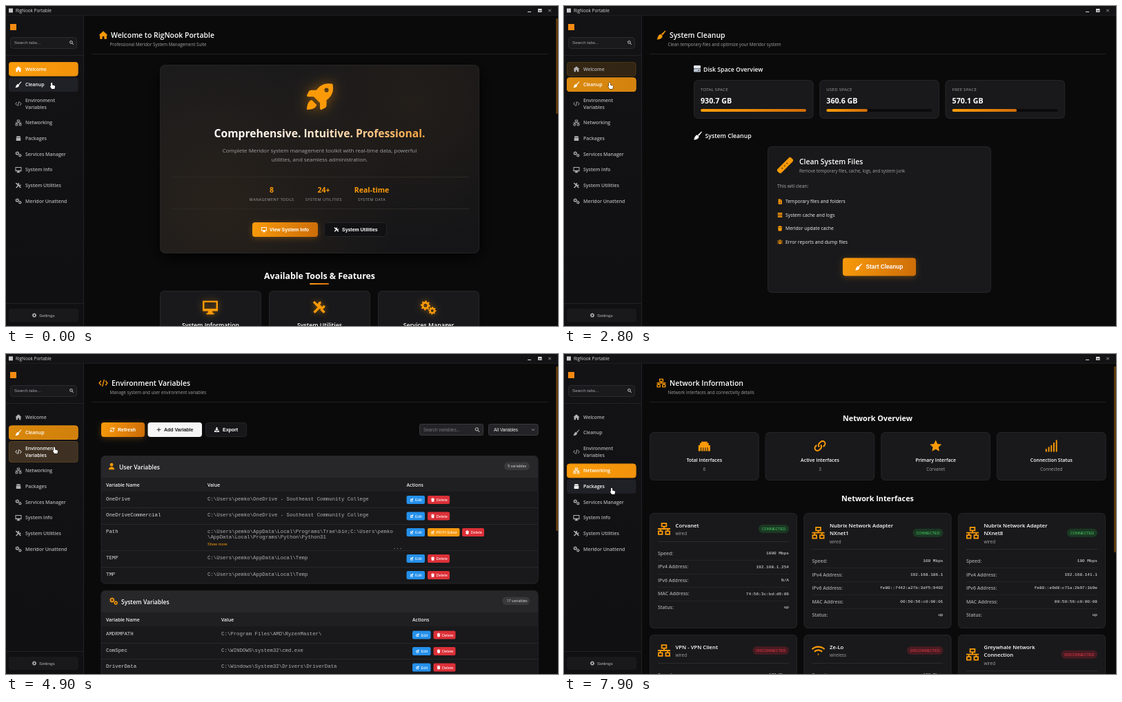
Write an HTML page with a canvas that moves like this. It is 800 px wide and 463 px high and loops after 8 s.

```html
<!DOCTYPE html>
<html lang="en">
<head>
<meta charset="utf-8">
<title>RigNook Portable</title>
<style>
html,body{margin:0;width:100%;height:100%;overflow:hidden;background:#0a0a0b}
canvas{display:block}
</style>
</head>
<body>
<canvas id="stage" width="800" height="463"></canvas>
<script>
const c = document.getElementById('stage').getContext('2d', {alpha: false});
const LOOP = 8000, STEP = 100;
const UI = '"Open Sans","Noto Sans",sans-serif';
const BTN = '"Liberation Sans",Arial,sans-serif';
const MONO = '"Liberation Mono",monospace';
const ORANGE = '#fb9a08', WHITE = '#fff', GREY = '#a3a3a6', EDGE = '#252528';

// Icons on a 16 x 16 grid: [path, stroke width or 0 for fill]
const ICONS = {
  home: ['M8 1L0 8.2h2V15h4.300v-4.500h3.400V15H14V8.200h2z', 0],
  broom: ['M15 0l1 1-6 7.500-2-2zM7 6.500l3 3C10 13 7 15.500 1 16l-1-1 2.200-2L1 13l1.500-3C4 7.500 5.500 6.500 7 6.500z', 0],
  code: ['M4 4L.8 8 4 12M12 4l3.200 4-3.200 4M9.700 2L6.300 14', 1.7],
  net: ['M5 1h6v4H5zM.8 11h5v4h-5zM10.200 11h5v4h-5zM8 5v3M0 8h16M3.300 8v3M12.700 8v3', 1.6],
  box: ['M3 1h10l2 4H1zM1 6h14v9H1z', 0],
  monitor: ['M0 1h16v11H0zM1.800 2.800v6.700h12.400V2.800zM6 12h4l.7 2H12v1.500H4V14h1.300z', 0],
  tools: ['M2 14L10 6M10 2.300A3.200 3.200 0 1 0 13.700 6M1.500 1.500L7 7M10 10l4 4', 2.7],
  search: ['M11 6.500A4.500 4.500 0 1 1 2 6.500A4.500 4.500 0 1 1 11 6.500M10 10l5 5', 2.3],
  rocket: ['M15.800.6Q15.700.2 15.300.2C14.400 0 13.600 0 13 0 9.500 0 7.400 1.900 5.800 4H2.600Q1.700 4 1.200 4.800L.1 7Q-.2 8 .8 8H4.200L8 11.800V15.200Q8 16.200 9 15.900L11.200 14.800Q12 14.400 12 13.400V10.200C14.100 8.600 16 6.500 16 3 16 2.300 16 1.500 15.800.6zM13.300 4A1.300 1.300 0 1 0 10.700 4A1.300 1.300 0 1 0 13.300 4zM3 10C1 10.300 0 13 0 15.900 3 16 5.700 15 6 13z', 0],
  file: ['M3 0h6v5h5v11H3zM10 0l4 4h-4zM8 7v3H6l2.500 3L11 10H9V7z', 0],
  data: ['M1 1h14v3.600H1zM1 6h14v4H1zM1 11.400h14V15H1z', 0],
  trash: ['M1 2h4l1-2h4l1 2h4v2H1zM2 5h12l-1 11H3z', 0],
  bug: ['M5 4a3 3 0 0 1 6 0zM4 5h8v6a4 4 0 0 1-8 0zM0 8h16v1.500H0zM1 3l4 3-1 1-4-3zM15 3l-4 3 1 1 4-3zM1 15l4-4-1-1-4 4zM15 15l-4-4 1-1 4 4z', 0],
  port: ['M0 7h2V4h2V2h8v2h2v3h2v8H0zM3 10v5h1v-5zM6 10v5h1v-5zM9 10v5h1v-5zM12 10v5h1v-5z', 0],
  link: ['M7 9.500a3.500 3.500 0 0 1 0-5l2-2a3.500 3.500 0 0 1 5 5l-1.500 1.500M9 6.500a3.500 3.500 0 0 1 0 5l-2 2a3.500 3.500 0 0 1-5-5L3.500 7', 1.9],
  star: ['M8 0l2.400 5.100 5.600.7-4.100 3.900 1.100 5.600L8 12.500 3 15.300l1.100-5.600L0 5.800l5.600-.7z', 0],
  signal: ['M0 12h1.800v4H0zM3.500 9.500h1.800V16H3.500zM7 7h1.800v9H7zM10.500 3.500h1.800V16h-1.800zM14 0h1.800v16H14z', 0],
  wifi: ['M0 6.500a11.500 11.500 0 0 1 16 0M3 9.500a7 7 0 0 1 10 0M7.400 13h1.200', 2],
  user: ['M12 4A4 4 0 1 0 4 4A4 4 0 1 0 12 4zM1 16c0-9 14-9 14 0z', 0],
  edit: ['M2 4h5v2H4v7h7v-3h2v5H2zM12 1l3 3-6 6-4 1 1-4z', 0],
  refresh: ['M2 7a6 6 0 0 1 11-2M14 1v5H9M14 9a6 6 0 0 1-11 2M2 15v-5h5', 2],
  plus: ['M8 1v14M1 8h14', 2.2],
  download: ['M6 0h4v6h4l-6 6-6-6h4zM0 11h4l4 3 4-3h4v5H0z', 0],
  down: ['M2 5l6 6 6-6', 2.5],
  close: ['M2 2l12 12M14 2L2 14', 2]
};
for (const k in ICONS) ICONS[k][0] = new Path2D(ICONS[k][0]);

function gear(x, y, r) {
  const p = new Path2D();
  for (let i = 0; i < 32; i++) {
    const a = i * Math.PI / 16, d = i % 4 < 2 ? r : r * .74;
    p.lineTo(x + d * Math.cos(a), y + d * Math.sin(a));
  }
  p.closePath();
  p.moveTo(x + r * .36, y);
  p.arc(x, y, r * .36, 0, 7);
  return p;
}
const twin = gear(5, 6, 5.2);
twin.addPath(gear(12.2, 11.5, 4.2));
ICONS.gears = [twin, 0];
ICONS.cog = [gear(8, 8, 8), 0];

function icon(name, x, y, size, color, glow = 0) {
  const [path, w] = ICONS[name];
  c.save();
  c.translate(x - size / 2, y - size / 2);
  c.scale(size / 16, size / 16);
  c.shadowColor = 'rgba(251,150,8,.5)';
  c.shadowBlur = glow;
  c.fillStyle = c.strokeStyle = color;
  c.lineWidth = w;
  if (w) c.stroke(path); else c.fill(path, 'evenodd');
  c.restore();
}

// y is the middle of the capitals
function text(s, x, y, size, color = WHITE, {w = 400, f = UI, a = 'left', ls = 0} = {}) {
  c.font = `${w} ${size}px ${f}`;
  c.textAlign = a;
  c.letterSpacing = ls + 'px';
  c.fillStyle = color;
  c.fillText(s, x, y + size * .36);
}
const semi = {w: 600}, mid = {a: 'center'}, midBold = {a: 'center', w: 700};
const btnFont = {f: BTN, w: 700}, mono = {f: MONO};

function box(x, y, x2, y2, r, fill, line) {
  c.beginPath();
  c.roundRect(x, y, x2 - x, y2 - y, r);
  c.fillStyle = fill;
  c.fill();
  if (line) {
    c.beginPath();
    c.roundRect(x + .5, y + .5, x2 - x - 1, y2 - y - 1, r);
    c.strokeStyle = line;
    c.lineWidth = 1;
    c.stroke();
  }
}
function rule(x, y, x2, color = '#222224') {
  c.fillStyle = color;
  c.fillRect(x, y, x2 - x, 1);
}
function blend(x, y, x2, y2, ...stops) {
  const g = c.createLinearGradient(x, y, x2, y2);
  stops.forEach((s, i) => g.addColorStop(i / (stops.length - 1), s));
  return g;
}
function haze(x, y, r, alpha) {
  const g = c.createRadialGradient(x, y, 0, x, y, r);
  g.addColorStop(0, `rgba(180,115,35,${alpha})`);
  g.addColorStop(1, 'rgba(180,115,35,0)');
  c.fillStyle = g;
  c.fillRect(x - r, y - r, 2 * r, 2 * r);
}
const card = (x, y, x2, y2) => box(x, y, x2, y2, 6, '#19191b', EDGE);

function hotButton(x, y, x2, y2) {
  c.save();
  c.shadowColor = 'rgba(245,150,10,.28)';
  c.shadowBlur = 8;
  c.shadowOffsetY = 2;
  box(x, y, x2, y2, 4, blend(x, y, x2, y2, '#f99b0b', '#cc6c08'));
  c.restore();
}
function header(name, title, sub, x = 153) {
  icon(name, 141, 42, 13, ORANGE);
  text(title, x, 42.5, 10.45, WHITE, semi);
  text(sub, 150.5, 55.5, 6.25, GREY);
  rule(124, 69, 785);
}

function welcome(t) {
  header('home', 'Welcome to RigNook Portable', 'Professional Meridor System Management Suite', 152);
  c.save();
  c.shadowColor = '#000';
  c.shadowBlur = 24;
  c.shadowOffsetY = 6;
  box(223, 85, 686, 358, 8, '#171719');
  c.restore();
  box(223, 85, 686, 358, 8, blend(223, 85, 686, 358, '#1a1a1c', '#151517'), '#252424');
  c.save();
  c.beginPath();
  c.roundRect(224, 86, 461, 271, 7);
  c.clip();
  const pulse = Math.sin(t / 1400);
  haze(316, 290, 250, .1 + .015 * pulse);
  haze(593, 140, 200, .075 - .01 * pulse);
  c.restore();

  const lift = 1.3 * Math.cos((t - 1100) * 2 * Math.PI / 3000);
  icon('rocket', 455, 132 + lift, 38, ORANGE, 18);
  text('Comprehensive. Intuitive. Professional.', 454.5, 184, 15.65,
    blend(302, 0, 607, 0, '#ffffff', '#fde7cc', '#f7a23e'), midBold);
  text('Complete Meridor system management toolkit with real-time data, powerful', 454.5, 209.5, 7.95, GREY, mid);
  text('utilities, and seamless administration.', 454.5, 222.5, 7.95, GREY, mid);
  rule(239, 247, 671, '#2c2925');
  rule(239, 293, 671, '#2c2925');
  [['8', 'MANAGEMENT TOOLS', 385], ['24+', 'SYSTEM UTILITIES', 460.5], ['Real-time', 'SYSTEM DATA', 530]].forEach(([n, l, x]) => {
    text(n, x, 266, 10.5, ORANGE, midBold);
    text(l, x, 280.5, 5.5, GREY, {a: 'center', ls: .5});
  });
  hotButton(357, 313, 452, 334);
  icon('monitor', 374, 323.5, 8, WHITE);
  text('View System Info', 382, 323.5, 6.95, WHITE, btnFont);
  box(461, 313, 552, 334, 4, '#111113', EDGE);
  icon('tools', 479, 323.5, 7.5, WHITE);
  text('System Utilities', 487, 323.5, 6.95, WHITE, btnFont);

  text('Available Tools & Features', 454.5, 391, 12.35, WHITE, midBold);
  box(440, 401, 468, 403, 1, blend(440, 0, 468, 0, '#ffa010', '#d97408'));
  [['monitor', 'System Information', 296], ['tools', 'System Utilities', 454], ['gears', 'Services Manager', 612]].forEach(([i, s, x]) => {
    card(x - 73, 412, x + 74, 480);
    icon(i, x, 436, i === 'tools' ? 20 : 22, ORANGE, 8);
    text(s, x + .5, 461.5, 8.7, WHITE, {a: 'center', w: 600});
  });
}

function cleanup() {
  header('broom', 'System Cleanup', 'Clean temporary files and optimize your Meridor system');
  box(188, 86, 198, 90.5, 1, '#e4e8ee');
  box(188, 91, 198, 95.5, 1, '#b9c2cf');
  box(194, 92.5, 196.5, 94, .5, '#596270');
  text('Disk Space Overview', 202, 91.5, 8.7, WHITE, semi);
  [['TOTAL SPACE', '930.7 GB', 1], ['USED SPACE', '360.6 GB', .39], ['FREE SPACE', '570.1 GB', .612]].forEach(([l, v, part], i) => {
    const x = 188 + i * 182.3;
    card(x, 107, x + 173.5, 163);
    text(l, x + 10, 121, 6.1, GREY, {ls: .25});
    text(v, x + 10, 137, 10.7, WHITE, {w: 700});
    box(x + 10, 149, x + 163, 153, 2, '#0b0b0c');
    box(x + 10, 149, x + 10 + 153 * part, 153, 2, blend(x + 10, 0, x + 10 + 153 * part, 0, '#ff9f0a', '#cf6c08'));
  });
  icon('broom', 194, 187.5, 12, WHITE);
  text('System Cleanup', 204.5, 188, 8.7, WHITE, semi);

  card(295, 203, 619, 415);
  c.save();
  c.translate(320.5, 230.5);
  c.rotate(-Math.PI / 4);
  box(-14, -4, 14, 4, 3, ORANGE);
  for (let i = 0; i < 3; i++) box(-7 + i * 5, -1, -5 + i * 5, 1, 1, '#744306');
  c.restore();
  text('Clean System Files', 341, 225.5, 10.4, WHITE, semi);
  text('Remove temporary files, cache, logs, and system junk', 341, 239, 6.2, GREY);
  text('This will clean:', 309, 261, 6.8, '#adadb0');
  [['file', 'Temporary files and folders'], ['data', 'System cache and logs'], ['trash', 'Meridor update cache'], ['bug', 'Error reports and dump files']].forEach(([i, s], k) => {
    icon(i, 313, 283 + k * 19.4, 7.5, ORANGE);
    text(s, 321, 283 + k * 19.4, 6.8, '#f4f4f4');
  });
  hotButton(404, 364.5, 510, 390.5);
  icon('broom', 427, 377.5, 10, WHITE);
  text('Start Cleanup', 437.5, 377.5, 8.3, WHITE, btnFont);
}

function chip(kind, x, y) {
  const [label, i, color, w] = {
    edit: ['Edit', 'edit', '#2590ea', 26.5],
    del: ['Delete', 'trash', '#dc3038', 32],
    path: ['PATH Editor', 'edit', '#f5980f', 46.5]
  }[kind];
  box(x, y - 6, x + w, y + 6, 2, color);
  icon(i, x + 7.5, y, 5.5, WHITE);
  text(label, x + 12.5, y, 5.7, WHITE, {f: BTN});
}

function table(y, bottom, title, i, tx, count, cols) {
  box(137.5, y, 771.5, bottom, 6, '#19191b', EDGE);
  box(138, y + .5, 771, y + 32, [6, 6, 0, 0], '#272729');
  box(138, y + 32, 771, y + 52, 0, '#1f1f21');
  icon(i, tx - 11, y + 15.5, i === 'gears' ? 12 : 9.5, ORANGE);
  text(title, tx, y + 16.5, 8.5, WHITE, semi);
  box(count.length > 11 ? 719 : 722, y + 9.5, 759, y + 21, 6, '#39393c');
  text(count, 740.5, y + 15.5, 5.4, '#e0e0e0', mid);
  ['Variable Name', 'Value', 'Actions'].forEach((s, k) => text(s, cols[k], y + 42.5, 6.85, '#f2f2f2', semi));
}
function row(name, value, y, cols) {
  text(name, cols[0], y - .5, 7.35, '#d6d6d6', mono);
  text(value, cols[1], y - .5, 7.35, '#b0b0b3', mono);
  chip('edit', cols[2], y + 1.5);
  if (name !== 'Path') chip('del', cols[2] + 30.5, y + 1.5);
}

function variables() {
  header('code', 'Environment Variables', 'Manage system and user environment variables');
  hotButton(138, 99, 201, 120);
  icon('refresh', 154, 109.5, 7.5, WHITE);
  text('Refresh', 162, 109.5, 7, WHITE, btnFont);
  box(205.5, 99, 284, 120, 4, '#f6f6f7');
  icon('plus', 221.5, 109.5, 6.5, '#222');
  text('Add Variable', 229, 109.5, 7, '#18181a', btnFont);
  box(289, 99, 349, 120, 4, '#17171a', EDGE);
  icon('download', 305.5, 109.5, 7, WHITE);
  text('Export', 314, 109.5, 7, WHITE, btnFont);
  box(599, 101, 692, 118, 3, '#242427', '#3a3a3e');
  text('Search variables...', 605, 109.5, 6.4, '#77777b', {f: BTN});
  icon('search', 683, 109.5, 7.5, '#aaa');
  box(699, 101, 771.5, 118, 3, '#242427', '#3a3a3e');
  text('All Variables', 707, 109.5, 6.4, '#f0f0f0', {f: BTN});
  icon('down', 764, 109.5, 5, '#ddd');

  const home = 'C:\\Users\\pemko', a = [145, 292, 580.5], b = [145, 312, 589];
  table(147, 332.5, 'User Variables', 'user', 164, '5 variables', a);
  row('OneDrive', home + '\\OneDrive - Southeast Community College', 209.5, a);
  row('OneDriveCommercial', home + '\\OneDrive - Southeast Community College', 233, a);
  row('Path', 'c:\\Users\\pemko\\AppData\\Local\\Programs\\Trae\\bin;' + home, 256.5, a);
  chip('path', 611, 258);
  chip('del', 661, 258);
  text('\\AppData\\Local\\Programs\\Python\\Python31', 292, 264.5, 7.35, '#b0b0b3', mono);
  text('Show more', 292, 274.5, 5.7, ORANGE, {f: BTN});
  text('...', 561, 279.5, 7.35, '#b0b0b3', mono);
  row('TEMP', home + '\\AppData\\Local\\Temp', 294.5, a);
  row('TMP', home + '\\AppData\\Local\\Temp', 318.5, a);
  [222, 246, 284, 308].forEach(y => rule(138, y, 771, '#28282a'));

  table(342, 480, 'System Variables', 'gears', 167, '17 variables', b);
  row('AMDRMPATH', 'C:\\Program Files\\AMD\\RyzenMaster\\', 405, b);
  row('ComSpec', 'C:\\WINDOWS\\system32\\cmd.exe', 428.5, b);
  row('DriverData', 'C:\\Windows\\System32\\Drivers\\DriverData', 452, b);
  [418, 441].forEach(y => rule(138, y, 771, '#28282a'));
}

function adapter(col, y, lines, up, kind, values) {
  const x = 124 + col * 223.5, s = (lines.length - 1) * 11.3;
  card(x, y, x + 214, y + 167);
  icon(kind === 'wireless' ? 'wifi' : 'net', x + 21, y + 23 + s / 2, 18, ORANGE);
  lines.forEach((l, i) => text(l, x + 37.5, y + 18 + i * 11.3, 7.75, WHITE, semi));
  text(kind, x + 37.5, y + 30 + s, 6.4, GREY);
  const w = up ? 44 : 52.5, by = y + 17 + s / 2;
  box(x + 202 - w, by, x + 202, by + 12, 6, up ? '#1b3923' : '#471b22');
  text(up ? 'CONNECTED' : 'DISCONNECTED', x + 202 - w / 2, by + 6, 5.4, up ? '#45d566' : '#ee3a48', {f: BTN, a: 'center'});
  rule(x + 12, Math.round(y + 41 + s), x + 202, '#2b2b2e');
  ['Speed', 'IPv4 Address', 'IPv6 Address', 'MAC Address', 'Status'].forEach((l, i) => {
    const ry = y + 58.5 + s + i * 19.5;
    text(l + ':', x + 12, ry, 6.9, '#a6a6a9', semi);
    text(values[i] || '', x + 202, ry - .5, 6.1, '#f0f0f0', {f: MONO, a: 'right'});
    if (i < 4) rule(x + 12, Math.round(ry + 9.5), x + 202, '#242427');
  });
}

function network() {
  header('net', 'Network Information', 'Network interfaces and connectivity details');
  text('Network Overview', 454.5, 93, 10.8, WHITE, midBold);
  [['port', 'Total Interfaces', '6'], ['link', 'Active Interfaces', '3'], ['star', 'Primary Interface', 'Corvanet'], ['signal', 'Connection Status', 'Connected']].forEach(([i, l, v], k) => {
    const x = 124 + k * 167.7;
    card(x, 113, x + 158.5, 183);
    icon(i, x + 79.3, 133, 17, ORANGE);
    text(l, x + 79.3, 153, 6.95, WHITE, {a: 'center', w: 600});
    text(v, x + 79.3, 166.5, 6.4, GREY, mid);
  });
  text('Network Interfaces', 454.5, 209.5, 10.8, WHITE, midBold);
  adapter(0, 230, ['Corvanet'], true, 'wired', ['1000 Mbps', '192.168.1.254', 'N/A', '74:56:3c:bd:d9:06', 'up']);
  adapter(1, 230, ['Nubrix Network Adapter', 'NXnet1'], true, 'wired', ['100 Mbps', '192.168.186.1', 'fe80::7442:a27b:3df5:9402', '00:50:56:c0:00:01', 'up']);
  adapter(2, 230, ['Nubrix Network Adapter', 'NXnet8'], true, 'wired', ['100 Mbps', '192.168.141.1', 'fe80::e9d8:c71a:2b97:1b9e', '00:50:56:c0:00:08', 'up']);
  adapter(0, 406, ['VPN - VPN Client'], false, 'wired', ['100 Mbps']);
  adapter(1, 406, ['Ze-Lo'], false, 'wireless', ['100 Mbps']);
  adapter(2, 406, ['Greywhale Network', 'Connection'], false, 'wired', []);
}

const NAV = [
  ['home', ['Welcome'], 81], ['broom', ['Cleanup'], 103.5], ['code', ['Environment', 'Variables'], 126],
  ['net', ['Networking'], 158.7], ['box', ['Packages'], 181.4], ['gears', ['Services Manager'], 204],
  ['monitor', ['System Info'], 226.7], ['tools', ['System Utilities'], 249.4], ['gears', ['Meridor Unattend'], 272]
];
const PAGES = [[0, welcome, 156], [2500, cleanup, 0], [4000, variables, 256], [6300, network, 287]];
const SWITCH = [-1000, 2500, 4850, 6480, Infinity];
const POINTER = [[0, 66, 111], [2900, 66, 111], [3600, 70, 135], [5200, 70, 135], [5900, 82, 171], [7000, 82, 171], [7700, 69, 194], [8000, 69, 194]];
const clamp = v => Math.max(0, Math.min(1, v));

function pointerAt(t) {
  const i = POINTER.findIndex(p => p[0] > t), a = POINTER[i - 1], b = POINTER[i];
  const u = (t - a[0]) / (b[0] - a[0]), e = u * u * (3 - 2 * u);
  return [a[1] + (b[1] - a[1]) * e, a[2] + (b[2] - a[2]) * e];
}
function activeLevel(i, t) {
  if (i > 3) return 0;
  return clamp((t - SWITCH[i]) / 350) * (1 - clamp((t - SWITCH[i + 1]) / 350));
}

function sidebar(t, py) {
  box(0, 14, 112, 463, 0, blend(0, 14, 0, 463, '#131315', '#101012'));
  c.fillStyle = '#222225';
  c.fillRect(112, 14, 1, 449);
  box(6, 26, 15, 35, 0, '#f58a12');
  box(6, 45, 103, 62, 4, '#1a1a1d', '#2b2b2f');
  text('Search tabs...', 12, 53, 6.2, '#a8a8ab', {f: BTN});
  icon('search', 95, 53, 6.5, '#ddd');
  rule(0, 71, 112);
  NAV.forEach(([i, lines, y], k) => {
    const h = lines.length > 1 ? 31 : 20.5, level = activeLevel(k, t);
    const hover = py >= y - 1 && py < y + h + 1;
    if (hover) box(4, y, 104.5, y + h, 4, '#202027');
    if (level) {
      c.globalAlpha = level;
      box(4, y, 104.5, y + h, 4, blend(4, y, 104, y + h, '#fa9c0a', '#f1920b'), '#e28c10');
      c.globalAlpha = 1;
    }
    const color = hover || level > .3 ? WHITE : '#b2b2b5', cy = y + h / 2;
    icon(i, 18, cy, i === 'box' ? 7.5 : 9, color);
    lines.forEach((s, n) => text(s, 28, cy + (n - (lines.length - 1) / 2) * 9.8, 6.95, color, semi));
  });
  rule(0, 430, 112);
  box(4, 438, 105, 457, 4, '#19191c');
  icon('cog', 41, 447.5, 6.5, '#bbb');
  text('Settings', 48, 447.5, 6.25, '#b4b4b7', {f: BTN});
}

function titleBar() {
  box(0, 0, 800, 13, 0, '#131315');
  rule(0, 13, 800, '#1d1d1f');
  box(4, 3.5, 10, 9.5, 0, '#c8c8ca');
  text('RigNook Portable', 14, 6.5, 6.4, '#d8d8da');
  c.fillStyle = '#ddd';
  c.fillRect(756, 8, 5, 1);
  c.fillRect(771, 4, 5.5, 5);
  c.fillStyle = '#777';
  c.fillRect(772, 6, 3.5, 2);
  icon('close', 788, 6.5, 5, '#ddd');
}

const HAND = new Path2D('M2 0c1 0 1.200.6 1.200 1.200V3.500l3 .8c.9.3 1 1 .8 2L6.300 9H2.200L.3 6C-.3 5 .4 4.600 1 5V1.200C1 .6 1.200 0 2 0z');
function pointer(x, y) {
  c.save();
  c.translate(x - 2, y);
  c.strokeStyle = '#111';
  c.lineWidth = 1;
  c.stroke(HAND);
  c.fillStyle = WHITE;
  c.fill(HAND);
  c.restore();
}

function draw(t) {
  box(0, 0, 800, 463, 0, '#0a0a0b');
  const [, page, thumb] = PAGES.filter(p => p[0] <= t).pop();
  page(t);
  if (thumb) box(797, 18, 800, thumb, 1, '#5c3a0b');
  const [x, y] = pointerAt(t);
  sidebar(t, y);
  titleBar();
  pointer(x, y);
}

let start, last = -1;
function tick(now) {
  start ??= now;
  const t = Math.floor((now - start) % LOOP / STEP) * STEP;
  if (t !== last) draw(last = t);
  requestAnimationFrame(tick);
}
draw(0);
requestAnimationFrame(tick);
</script>
</body>
</html>
```
